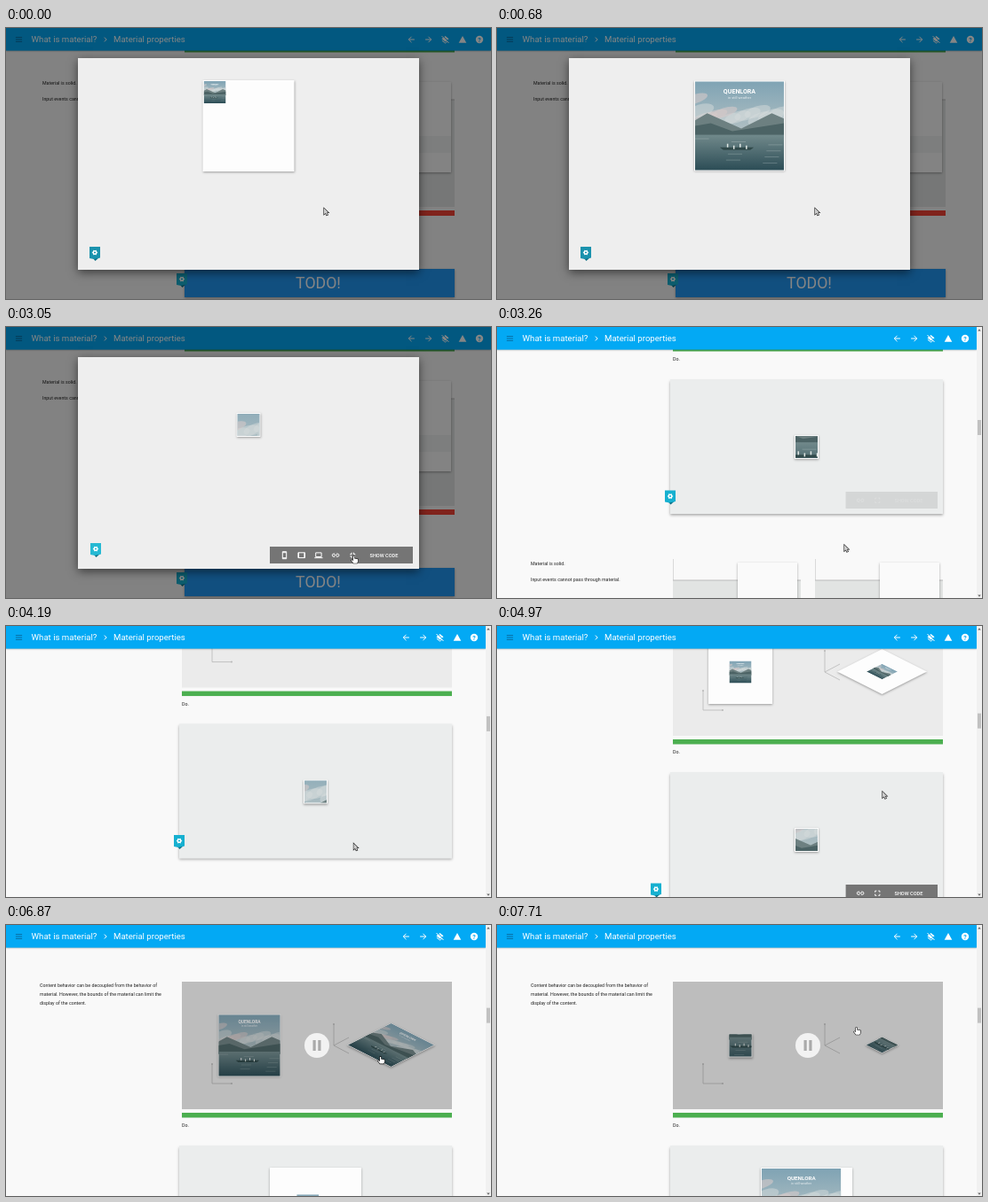
An HTML page with a canvas that plays this animation: 546 by 306 pixels, repeating every 7.81 s.

```html
<!DOCTYPE html>
<html lang="en">
<head>
<meta charset="utf-8">
<title>Material properties</title>
<style>
html, body { margin: 0; width: 546px; height: 306px; overflow: hidden; background: #fafafa }
canvas { display: block }
</style>
</head>
<body>
<canvas id="stage" width="546" height="306"></canvas>
<script>
const c = document.getElementById('stage').getContext('2d');
const LOOP = 7810, CYCLE = 7310, EXIT = 3170;
const FONT = 'Roboto, sans-serif';

// Smooth step from 0 to 1 between two times
function ramp(t, start, end) {
  const u = Math.min(1, Math.max(0, (t - start) / (end - start)));
  return u * u * (3 - 2 * u);
}

function box(x, y, w, h, color) {
  c.fillStyle = color;
  c.fillRect(x, y, w, h);
}

function raised(x, y, w, h, color, blur = 2.5, drop = 1, alpha = .35) {
  c.save();
  c.shadowColor = `rgba(0,0,0,${alpha})`;
  c.shadowBlur = blur;
  c.shadowOffsetY = drop;
  box(x, y, w, h, color);
  c.restore();
}

function shape(path, color) {
  c.fillStyle = color;
  c.fill(new Path2D(path));
}

function line(path, color, width = 1) {
  c.strokeStyle = color;
  c.lineWidth = width;
  c.stroke(new Path2D(path));
}

function disc(x, y, r, color) {
  c.fillStyle = color;
  c.beginPath();
  c.arc(x, y, r, 0, 7);
  c.fill();
}

function text(s, x, y, size, color, weight = 400, align = 'left') {
  c.font = `${weight} ${size}px ${FONT}`;
  c.textAlign = align;
  c.fillStyle = color;
  c.fillText(s, x, y);
}

const body = (s, x, y) => text(s, x, y, 5.3, '#222');

function place(x, y, draw, alpha = 1) {
  c.save();
  c.translate(x, y);
  c.globalAlpha *= alpha;
  draw();
  c.restore();
}

const ICONS = {
  menu: 'M-3.6-2.4h7.2M-3.6 0h7.2M-3.6 2.4h7.2',
  arrow: 'M-3.4 0h6.6M0-3.2L3.2 0 0 3.2',
  chevron: 'M-1.2-2.4L1.2 0-1.2 2.4',
  phone: 'M-2.2-4h4.4v8h-4.4zM-2.2-3h4.4M-2.2 3h4.4',
  tablet: 'M-3.8-2.9h7.6v5.8h-7.6zM-3.2-2.9v5.8M3.2-2.9v5.8',
  laptop: 'M-3.2-2.8h6.4v4.6h-6.4zM-4.6 3h9.2',
  link: 'M-.8-1.6h-1.4a1.6 1.6 0 0 0 0 3.2h1.4M.8-1.6h1.4a1.6 1.6 0 0 1 0 3.2h-1.4M-1.6 0h3.2'
};
// Four mirrored corner marks, pointing inwards or outwards
const corners = path => () => {
  for (const sx of [-1, 1]) for (const sy of [-1, 1]) {
    c.save();
    c.scale(sx, sy);
    line(path, '#fff');
    c.restore();
  }
};
const drawn = name => () => line(ICONS[name], '#fff');
const shrink = corners('M3 1.2H1.2V3'), expand = corners('M2.6 1v1.6H1');

function gear(x, y, color = '#16b0d0') {
  place(x, y, () => {
    shape('M3 12h8l-4.5 4z', '#0b6f85');
    shape('M0 0h12v12.5l-7 1.5-5-1z', color);
    c.strokeStyle = '#fff';
    c.lineWidth = 1.5;
    c.beginPath();
    c.arc(6, 6.5, 1.8, 0, 7);
    c.stroke();
    for (let a = 0; a < 6; a += Math.PI / 3) disc(6 + 2.6 * Math.cos(a), 6.5 + 2.6 * Math.sin(a), .6, '#fff');
  });
}

// Lake landscape in a 100 unit square
function scene() {
  const fade = (y, h, from, to) => {
    const g = c.createLinearGradient(0, y, 0, y + h);
    g.addColorStop(0, from);
    g.addColorStop(1, to);
    box(0, y, 100, h, g);
  };
  fade(0, 60, '#7fa3b4', '#b4c2c4');
  for (let i = 0; i < 12; i++) {
    c.fillStyle = i % 3 ? 'rgba(214,220,220,.5)' : 'rgba(214,202,202,.6)';
    c.beginPath();
    c.ellipse(i * 37 % 100, 20 + i * 23 % 24, 15, 5 + i % 3, -.3, 0, 7);
    c.fill();
  }
  shape('M0 44L14 36 52 53 86 36 100 42V64H0z', '#6d8081');
  shape('M0 50L18 47 42 56 100 47V64H0z', '#4c6365');
  fade(60, 40, '#71898b', '#2b4c55');
  for (let i = 0; i < 9; i++) box(i * 41 % 84, 64 + i * 3.4, 16, .8, 'rgba(214,226,222,.3)');
  shape('M28 74h38l-4 3H32z', '#30494a');
  for (let i = 0; i < 4; i++) box(36 + i * 7, 70 + i % 2 * 2, 1.5, 4, '#dfe6e3');
  text('QUENLORA', 50, 14, 7, '#fff', 700, 'center');
  text('in still weather', 50, 20, 4, 'rgba(255,255,255,.8)', 400, 'center');
}

// A sheet whose picture scales, slides and pans inside its bounds
function sheet(full, time) {
  const p = (time + CYCLE) % CYCLE, big = full - 2;
  const w = full + (27 - full) * (ramp(p, 650, 1100) - ramp(p, 5200, 5600));
  const size = 25 + (big - 25) * (ramp(p, 100, 500) - ramp(p, 4990, 5200));
  const aside = (1 - ramp(p, 100, 500) + ramp(p, 6700, 7250)) * (25 - big) / 2;
  const pan = (ramp(p, 1100, 1500) - ramp(p, 4990, 5200)) * full;
  const swing = (p - 3050) / 600 * 2 * Math.PI;
  const x = aside + pan * .06 * Math.sin(swing / 3);
  const y = aside + pan * (.2 * Math.cos(swing) - .03);
  raised(-w / 2, -w / 2, w, w, '#fdfdfd');
  c.save();
  c.beginPath();
  c.rect(1 - w / 2, 1 - w / 2, w - 2, w - 2);
  c.clip();
  c.translate(x - size / 2, y - size / 2);
  c.scale(size / 100, size / 100);
  c.beginPath();
  c.rect(0, 0, 100, 100);
  c.clip();
  scene();
  c.restore();
}

function video(t) {
  const hover = ramp(t, 6050, 6480), mark = '#b8b8b8';
  box(0, 0, 304, 144, '#ebebeb');
  line('M34 93v22h22M171 48v24l17-9m-17 9l17 9', mark, .8);
  for (const [x, y] of [[34, 93], [56, 115], [171, 48]]) disc(x, y, 1, mark);
  place(76, 72, () => sheet(72, t - 6180));
  place(235.5, 71.5, () => {
    c.transform(.702, .354, -.702, .354, 0, 0);
    sheet(72, t - 6180);
  });
  box(0, 0, 304, 144, `rgba(0,0,0,${.195 * hover})`);
  place(152, 72, () => {
    disc(0, 0, 14, '#f2f2f2');
    for (const x of [-4.5, 1.3]) box(x, -6, 3.2, 12, '#aaa');
  }, Math.min(1, hover * 2.5));
}

function toolbar(right, y, icons, alpha) {
  const w = 65 + icons.length * 19.2;
  place(right - w, y, () => {
    box(0, 0, w, 19, '#757575');
    icons.forEach((draw, i) => place(16.5 + i * 19.2, 9.7, draw));
    text('SHOW CODE', w - 48.5, 11.6, 5.6, '#fff', 500);
  }, alpha);
}

function header(w) {
  raised(0, 0, w, 25.6, '#03a9f4', 2, .5, .3);
  place(14.5, 13, () => line(ICONS.menu, '#086fa5'));
  text('What is material?', 28.6, 16.2, 9.6, '#fff');
  place(112, 13, drawn('chevron'));
  text('Material properties', 121, 16.2, 9.6, '#fff');
  place(w - 89.5, 13, () => {
    c.scale(-1, 1);
    line(ICONS.arrow, '#fff');
  });
  place(w - 70.5, 13, drawn('arrow'));
  place(w - 51.5, 13, () => {
    shape('M0-4l4 3.2L0 2.4-4-.8z', '#fff');
    line('M-3.6 1.2L0 4 3.6 1.2M-4-4L4 4', '#fff');
    line('M-3-4.4L4.4 3', '#03a9f4');
  });
  place(w - 32, 13, () => shape('M0-4l4.3 7.7h-8.6z', '#fff'));
  disc(w - 13, 13, 4.2, '#fff');
  text('?', w - 13, 15.6, 7, '#03a9f4', 700, 'center');
}

function rules(y) {
  body('Material is solid.', 38, y + 7);
  body('Input events cannot pass through material.', 38, y + 24.6);
  for (const x of [198, 358]) {
    box(x, y, .7, 145, '#ccc');
    box(x, y + 24, 144, 121, '#e2e4e3');
    box(x, y + 23.5, 144, 1, '#bbb');
    raised(x + 73, y + 4, 67, 102, '#fafafa');
    box(x + 73, y + 65, 67, 19, '#eef0f0');
    box(x, y + 149, 144, 6, '#f44336');
  }
  raised(198, y + 215, 304, 32, '#2196f3');
  text('TODO!', 348.5, y + 236.8, 17.7, '#fff', 400, 'center');
  gear(189, y + 220);
}

function page(t, full) {
  const scroll = 53 * (ramp(t, 3650, 4250) + ramp(t, 4400, 4960)) + 84 * ramp(t, 5060, 5600);
  box(0, 0, 546, 306, '#f9f9f9');
  place(full ? 3 : 0, scroll, () => {
    ['Content behavior can be decoupled from the behavior of',
      'material. However, the bounds of the material can limit the',
      'display of the content.'].forEach((s, i) => body(s, 38, -119.6 + i * 9.6));
    place(198, -126, () => video(t));
    box(198, 22, 304, 5.5, '#4caf50');
    body('Do.', 198, 38);
    if (!full) {
      const over = ramp(t, 4400, 4650);
      raised(195, 59, 307, 152, '#ebeded', 3, 1.5);
      place(348.5, 135.5, () => sheet(103, t));
      toolbar(496, 186, [drawn('link'), expand],
        .4 * (1 - ramp(t, 3120, 3400)) + over - ramp(t, 5500, 5700));
      gear(189 - 16 * over, 184.5);
    }
    rules(full ? 57 : 262);
  });
  header(full ? 546 : 540);
  if (full) return;
  box(540, 0, 6, 306, '#f1f1f1');
  box(541, 105 - scroll * .06, 4, 17, '#c1c1c1');
  shape('M541.2 4.5h3.6l-1.8-2.2zM541.2 302.5h3.6l-1.8 2.2z', '#666');
}

function modal(t) {
  box(0, 0, 546, 306, 'rgba(0,0,0,.48)');
  raised(81, 34, 384, 239, '#eee', 10, 3, .55);
  place(273, 110.5, () => sheet(103, t));
  const shown = ramp(t, 700, 1000);
  gear(94 + shown, 247 - 3 * shown, shown > .5 ? '#26b9d3' : '#1a92ad');
  toolbar(458, 248, [...['phone', 'tablet', 'laptop', 'link'].map(drawn), shrink], shown);
}

// Each stop: start of the move, then its end point
const STOPS = [[800, 375, 235], [2100, 391, 259], [3160, 391, 246], [4150, 434, 187],
  [5250, 421, 149], [6850, 404, 116]];

function cursor(t) {
  let x = 358, y = 203.5;
  for (const [start, toX, toY] of STOPS) {
    const u = ramp(t, start, start + (start === 3160 ? 100 : 750));
    x += (toX - x) * u;
    y += (toY - y) * u;
  }
  const hand = t > 2600 && t < EXIT || t > 5800;
  const path = hand
    ? 'M0 0h1.2v2.6l4 .7v2.4l-1 2h-4l-2.4-3 .6-.6 1.6 1z'
    : 'M0 0v7l1.7-1.5 1.2 2.5 1.3-.6-1.2-2.4h2z';
  place(x, y, () => {
    line(path, '#111', 1.1);
    shape(path, hand ? '#fff' : '#ccc');
  });
}

function frame(now) {
  const t = now % LOOP, full = t < EXIT;
  page(t, full);
  if (full) modal(t);
  cursor(t);
  requestAnimationFrame(frame);
}
requestAnimationFrame(frame);
</script>
</body>
</html>
```
